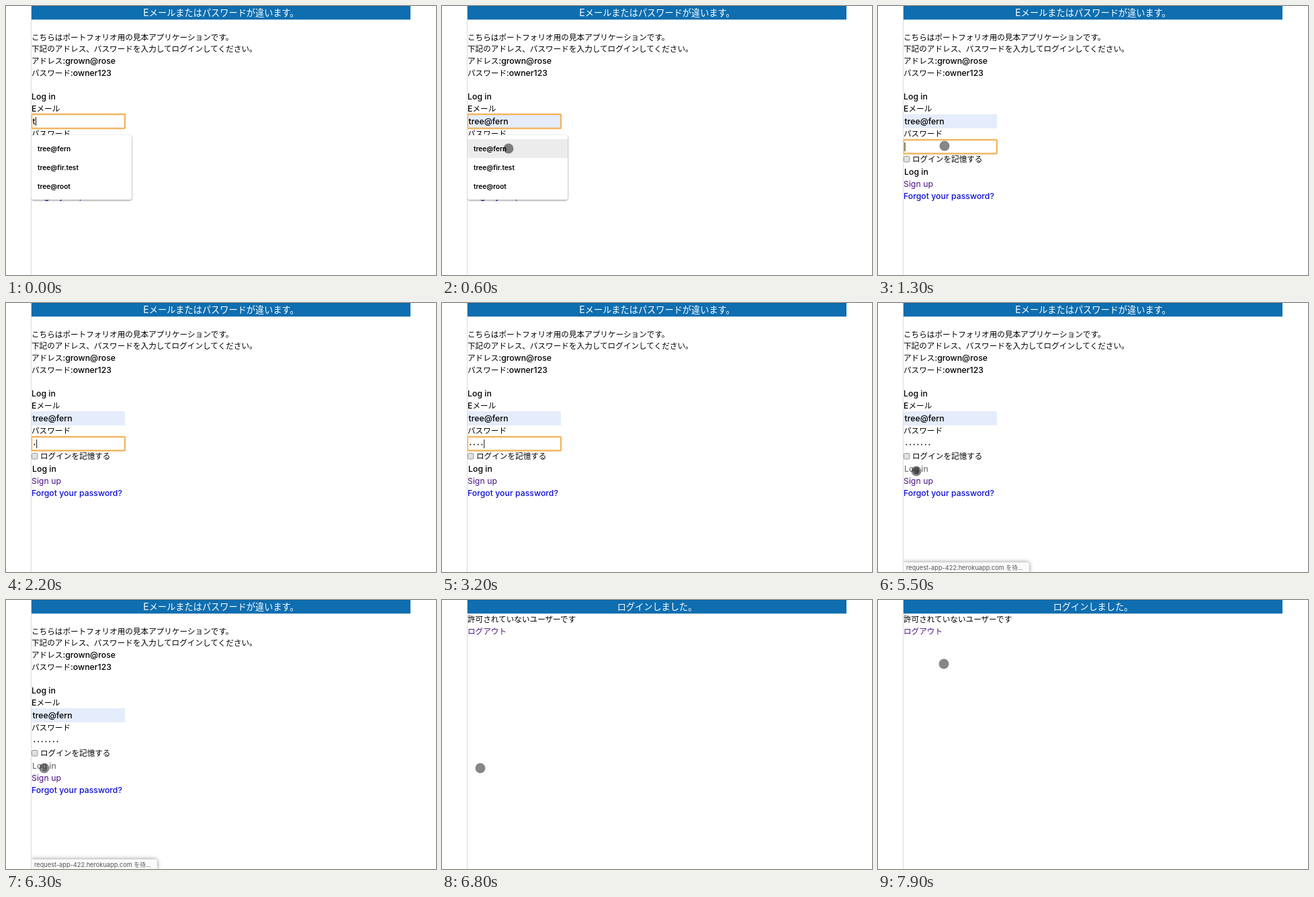
An HTML page that plays this animation: 640x400 px, repeating every 8 s.

```html
<!DOCTYPE html>
<html lang="ja">
<head>
<meta charset="utf-8">
<title>ログイン</title>
<style>
  html, body { margin: 0; width: 100%; height: 100%; overflow: hidden; background: #fff; }
  svg { display: block; width: 640px; height: 400px; }
  text { font-family: Inter, "Noto Sans CJK JP", sans-serif; white-space: pre; }
  tspan { font-size: 1.06em; }
  .ring { fill: #fff; stroke: #f2b661; stroke-width: 2.4; }
  .caret { fill: #111; }
  .panel { filter: drop-shadow(0 1px 1.5px #0007); }
  .bubble { filter: drop-shadow(0 0 3px #0007); }
</style>
</head>
<body>
<svg viewBox="0 0 640 400">
  <rect x="38" width="564" height="20.2" fill="#0e6eb0"/>
  <path d="M38 .5H602" stroke="#0b5f9a"/>

  <g id="login">
    <rect id="filled" x="38" y="161" width="139" height="21" fill="#e5ecfb"/>
    <rect id="mailRing" class="ring" x="38" y="161" width="139" height="21" rx="1.5"/>
    <rect id="passRing" class="ring" x="38" y="199" width="139" height="20.5" rx="1.5"/>
    <rect x="38.5" y="223.5" width="8.5" height="8.5" rx="1.8" fill="#e2e2e2" stroke="#8c8c8c" stroke-width=".9"/>
    <g id="dots"></g>
    <rect id="mailCaret" class="caret" x="44" y="165" width="1" height="13"/>
    <rect id="passCaret" class="caret" y="203" width="1" height="13"/>
  </g>

  <g id="menu">
    <rect class="panel" x="38" y="192" width="149" height="96" rx="3" fill="#fff"/>
    <rect id="hover" x="38" y="198" width="149" height="28" fill="#ececec"/>
  </g>

  <g id="status">
    <path class="bubble" d="M37 401V385.5H221.5Q225 385.5 225 389V401Z" fill="#fafafa"/>
  </g>

  <g id="home"></g>

  <rect width="37" height="400" fill="#fff"/>
  <path d="M37.5 0V400" stroke="#dadada"/>

  <g id="pointer">
    <circle r="7.5" fill="#000" fill-opacity=".47"/>
    <circle id="press" r="4.8" fill="#000" fill-opacity=".3"/>
  </g>
</svg>
<script>
const $ = id => document.getElementById(id);
const NS = 'http://www.w3.org/2000/svg';
const LOOP = 8000, STEP = 100;
const BASE = 11.62, TITLE = 13.2;
const VISITED = '#4a1486';

function add(parent, tag, attrs) {
  const el = document.createElementNS(NS, tag);
  for (const key in attrs) el.setAttribute(key, attrs[key]);
  return parent.appendChild(el);
}

// Latin runs are set slightly larger than the kana around them.
function write(parent, x, y, string, attrs) {
  const el = add($(parent), 'text', { x, y, 'font-size': BASE, 'font-weight': 500, fill: '#000', ...attrs });
  el.innerHTML = string.replace(/[ -~]+/g, '<tspan>$&</tspan>');
  return el;
}

const title = { 'font-size': TITLE, 'font-weight': 400, fill: '#fff', 'text-anchor': 'middle' };
const link = { 'font-weight': 400, fill: VISITED };
write('login', 320, 14.5, 'Eメールまたはパスワードが違います。', title);
write('login', 38, 50.5, 'こちらはポートフォリオ用の見本アプリケーションです。');
write('login', 38, 68.2, '下記のアドレス、パスワードを入力してログインしてください。');
write('login', 38, 86, 'アドレス:grown@rose');
write('login', 38, 103.6, 'パスワード:owner123');
write('login', 38, 138.7, 'Log in');
write('login', 38, 156.5, 'Eメール');
const typed = write('login', 39.5, 175.5, 't');
const mail = write('login', 39.5, 175.5, 'tree@fern');
write('login', 38, 194.3, 'パスワード');
write('login', 51, 232.4, 'ログインを記憶する');
const button = write('login', 39, 251.2, 'Log in');
write('login', 38, 269.4, 'Sign up', link);
write('login', 38, 287.2, 'Forgot your password?', { fill: '#1010d0' });

['tree@fern', 'tree@fir.test', 'tree@root'].forEach((entry, i) =>
  write('menu', 47, 215.5 + 28 * i, entry, { 'font-size': 9.5, 'font-weight': 600 }));

write('status', 42, 396.6, 'request-app-422.herokuapp.com を待...', { 'font-size': 8.7, 'font-weight': 400, fill: '#555' });

write('home', 320, 14.5, 'ログインしました。', title);
write('home', 38, 33.2, '許可されていないユーザーです');
write('home', 38, 50.6, 'ログアウト', { fill: VISITED });

const keyTimes = [2200, 2500, 2800, 3100, 3400, 3700, 4000];
const dots = keyTimes.map((_, i) => add($('dots'), 'circle', { cx: 42.3 + 5.7 * i, cy: 210.5, r: .9 }));

// Pointer path: time, x, y
const path = [
  [300, 118, 232], [500, 99, 212], [900, 99, 212], [1100, 99, 208], [4200, 99, 208],
  [4600, 57, 255], [4900, 57, 250], [7000, 57, 250], [7200, 110, 203],
  [7500, 117, 168], [7600, 117, 168], [7800, 91, 120], [7900, 98, 95]
];

function pointerAt(t) {
  const next = path.findIndex(p => p[0] > t);
  if (next < 1) return (next ? path[path.length - 1] : path[0]).slice(1);
  const [a, b] = [path[next - 1], path[next]];
  const k = (t - a[0]) / (b[0] - a[0]);
  return [a[1] + (b[1] - a[1]) * k, a[2] + (b[2] - a[2]) * k];
}

const show = (el, on) => el.style.display = on ? '' : 'none';
const between = (t, from, to) => t >= from && t < to;

function render(t) {
  const chosen = t >= 500;
  const loggedIn = t >= 6600;
  const sent = t >= 5500;
  const passFocus = between(t, 1200, 5500);
  const count = keyTimes.filter(k => k <= t).length;
  const lastInput = count ? keyTimes[count - 1] : 1200;

  show($('login'), !loggedIn);
  show($('home'), loggedIn);
  show($('menu'), t < 900);
  show($('hover'), between(t, 500, 900));
  show($('status'), sent && !loggedIn);

  show($('mailRing'), t < 1200);
  $('mailRing').style.fill = chosen ? '#e5ecfb' : '#fff';
  show($('filled'), chosen);
  show(typed, !chosen);
  show(mail, chosen);
  show($('mailCaret'), !chosen);

  show($('passRing'), passFocus);
  dots.forEach((dot, i) => show(dot, i < count));
  show($('passCaret'), passFocus && (t - lastInput) % 1000 < 500);
  $('passCaret').setAttribute('x', 39.5 + 5.7 * count);
  button.setAttribute('fill', sent ? '#777' : '#000');

  show($('pointer'), between(t, 300, 1800) || t >= 4200);
  show($('press'), between(t, 5400, 5700));
  $('pointer').setAttribute('transform', `translate(${pointerAt(t)})`);
}

function tick() {
  const t = performance.now() % LOOP;
  render(Math.floor(t / STEP) * STEP);
  requestAnimationFrame(tick);
}
tick();
</script>
</body>
</html>
```
